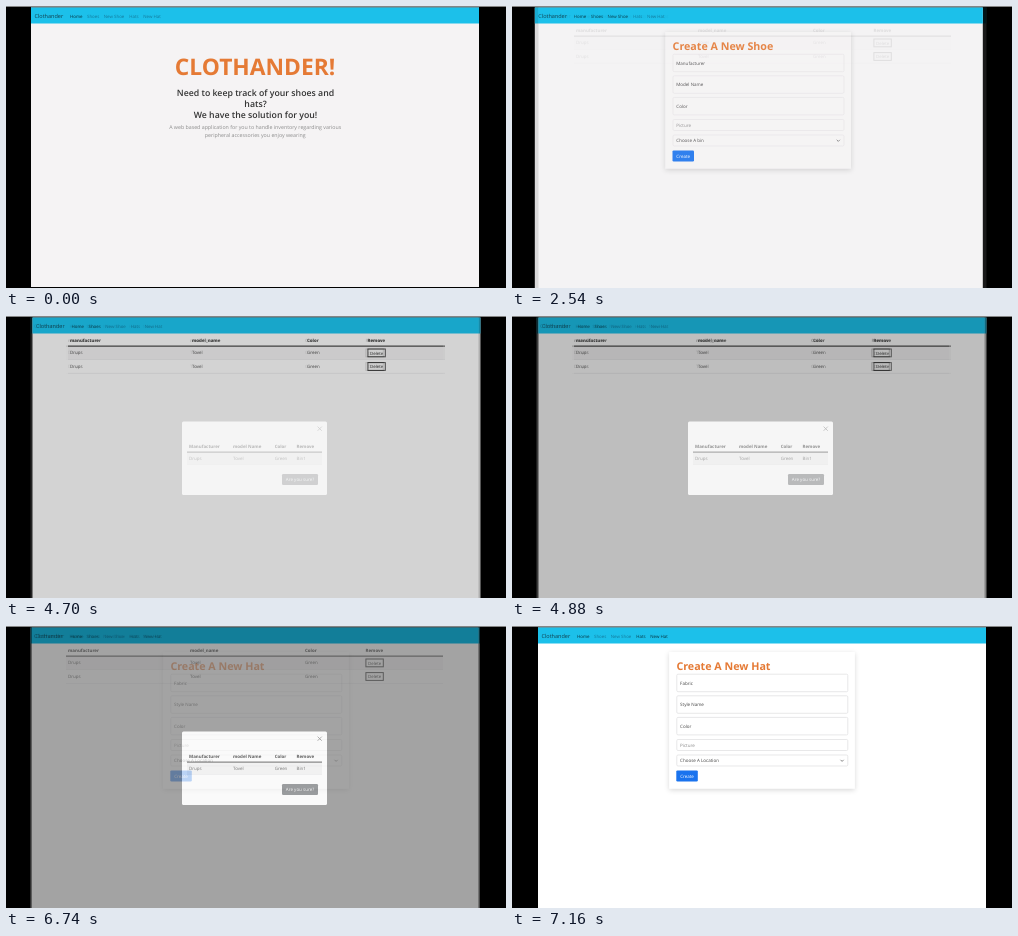
Recreate the animation shown at these times as an HTML page. Size 500 px wide and 282 px high, loop 8000 ms.

```html
<!DOCTYPE html>
<html lang="en">
<head>
<meta charset="utf-8">
<title>Wardrobe inventory demo</title>
<style>
  html, body { margin: 0; width: 100%; height: 100%; overflow: hidden; background: #000; }
  svg { display: block; width: 100vw; height: 100vh; }
  text { font-family: "Open Sans", "Noto Sans", sans-serif; text-rendering: geometricPrecision; white-space: pre; }
</style>
</head>
<body>
<svg id="stage" viewBox="0 0 500 282"></svg>
<script>
const BRAND = "Clothander", MAKER = "Drups", MODEL = "Tovel";
const ORANGE = "#e57a35";

const rect = (x, y, w, h, fill, extra = "") =>
  `<rect x="${x}" y="${y}" width="${w}" height="${h}" fill="${fill}" ${extra}/>`;
const text = (x, y, str, size = 4.5, fill = "#444", weight = 400, anchor = "start") =>
  `<text x="${x}" y="${y}" font-size="${size}" fill="${fill}" font-weight="${weight}" text-anchor="${anchor}">${str}</text>`;
const shift = (dx, content) => `<g transform="translate(${dx} 0)">${content}</g>`;

// Page shell: black surround, background and navigation bar.
function page(left, background, visited, content, bottom = 282) {
  const links = [["Home", 39], ["Shoes", 56], ["New Shoe", 72.8], ["Hats", 98.3], ["New Hat", 112.3]];
  const nav = rect(0, 1.5, 448, 16, "#1cc0ea") +
    text(3.5, 12.2, BRAND, 5.5, "#123f4e") +
    links.map(([label, x]) =>
      text(x, 12, label, 4.4, visited.includes(label) ? "#08303d" : "#14789a")).join("");
  return rect(0, 0, 500, 282, "#000") +
    shift(left, rect(0, 1.5, 448, bottom - 1.5, background) + nav) +
    content + rect(0, 0, 500, 1, "#858585");
}

function home() {
  const line = (y, str) => text(249.5, y, str, 8.75, "#333", 600, "middle");
  const note = (y, str) => text(249.2, y, str, 5.27, "#8c8c8c", 400, "middle");
  return text(249, 69.3, BRAND.toUpperCase() + "!", 22.8, ORANGE, 700, "middle") +
    line(89.5, "Need to keep track of your shoes and") +
    line(100.5, "hats?") +
    line(111.5, "We have the solution for you!") +
    note(122.6, "A web based application for you to handle inventory regarding various") +
    note(131.2, "peripheral accessories you enjoy wearing");
}

function form(title, labels, choice, fill, border) {
  const box = (y, h) => rect(8, y, 171, h, fill, `rx="1.2" stroke="${border}" stroke-width=".7"`);
  return rect(0.4, 26, 185.6, 136.5, fill, 'filter="url(#shadow)"') +
    text(7.6, 43.8, title, 10.7, ORANGE, 700) +
    labels.map((label, i) => box(48.2 + i * 21.6, 17.5) + text(11.3, 58.8 + i * 21.6, label)).join("") +
    box(113.5, 11) + text(11.3, 120.7, "Picture", 4.5, "#888") +
    box(129, 11) + text(11.3, 136.2, choice) +
    `<path d="M171.7 133.8l1.6 1.6 1.6-1.6" fill="none" stroke="#555" stroke-width=".7"/>` +
    rect(7.5, 144.4, 21.5, 11, "#1a73ee", 'rx="1.2"') +
    text(18.2, 151.6, "Create", 4.5, "#fff", 400, "middle");
}

const cells = (columns, y, values, weight, fill) =>
  values.map((value, i) => text(columns[i], y, value, 4.45, fill, weight)).join("");

function table() {
  const columns = [64, 186, 301, 361.5];
  const row = y => cells(columns, y + 7.3, [MAKER, MODEL, "Green"], 400, "#444") +
    rect(361.9, y + 2.4, 17.4, 7.8, "#efefef", 'stroke="#333" stroke-width="1"') +
    text(370.6, y + 7.9, "Delete", 4.3, "#222", 400, "middle") +
    rect(62, y + 12.7, 377, .6, "#dedee0");
  return cells(columns, 25.5, ["manufacturer", "model_name", "Color", "Remove"], 700, "#222") +
    rect(62, 30.5, 377, 13, "#ebeaeb") + rect(62, 29.6, 377, 1, "#222") +
    row(30.6) + row(44.2);
}

function dialog() {
  const columns = [183, 227, 268.7, 290.5];
  return rect(176, 105.5, 145, 73.5, "#f9f9f9", 'rx="1.5"') +
    `<path d="M311.6 110.6l4.2 4.2m0-4.2l-4.2 4.2" stroke="#777" stroke-width=".8"/>` +
    cells(columns, 132, ["Manufacturer", "model Name", "Color", "Remove"], 700, "#222") +
    rect(181, 137, 135, 11, "#ececec") + rect(181, 135.6, 135, 1, "#333") +
    rect(181, 148, 135, .6, "#dedee0") +
    cells(columns, 144.3, [MAKER, MODEL, "Green", "Bin1"], 400, "#444") +
    rect(276, 158, 36, 11, "#74777a", 'rx="1.2"') +
    text(294, 165.2, "Are you sure?", 4.5, "#fff", 400, "middle");
}

const shoeForm = form("Create A New Shoe", ["Manufacturer", "Model Name", "Color"],
  "Choose A bin", "#f6f4f5", "#e6e4e6");
const hatForm = form("Create A New Hat", ["Fabric", "Style Name", "Color"],
  "Choose A Location", "#fff", "#dedee0");

const scenes = [
  page(25, "#f5f3f4", ["Home"], home(), 281),
  page(22.8, "#f4f3f4", ["Home", "Shoes", "New Shoe"], shift(153, shoeForm)),
  page(26.5, "#f4f4f4", ["Home", "Shoes"], table()),
  page(24.5, "#f4f4f4", ["Home", "Shoes"],
    shift(-2, table()) + rect(0, 1, 500, 281, "#000", 'opacity=".48"') + dialog()),
  page(26, "#fff", ["Home", "Hats", "New Hat"], shift(156.8, hatForm))
];

const stage = document.getElementById("stage");
stage.innerHTML = `<filter id="shadow" x="-10%" y="-10%" width="120%" height="120%">
    <feDropShadow dx="0" dy="1.5" stdDeviation="2.4" flood-opacity=".16"/></filter>` +
  scenes.map(content => `<g class="scene">${content}</g>`).join("");
const layers = [...stage.querySelectorAll(".scene")];

// Each scene dissolves over the previous one in a few discrete steps.
const LOOP = 8000;
const STEP_TIMES = [0, 120, 220, 320, 420, 540];
const fades = [[500, 5], [2540, 6], [4700, 5], [6740, 5]];

function fadeLevel(elapsed, steps) {
  const done = STEP_TIMES.slice(0, steps).filter(time => time <= elapsed).length;
  return done ? 1 - 0.18 * (steps - done) : 0;
}

function draw() {
  const t = performance.now() % LOOP;
  fades.forEach(([start, steps], i) => {
    const level = fadeLevel(t - start, steps);
    layers[i + 1].style.opacity = level;
    layers[i + 1].style.display = level ? "" : "none";
  });
  requestAnimationFrame(draw);
}
draw();
</script>
</body>
</html>
```
